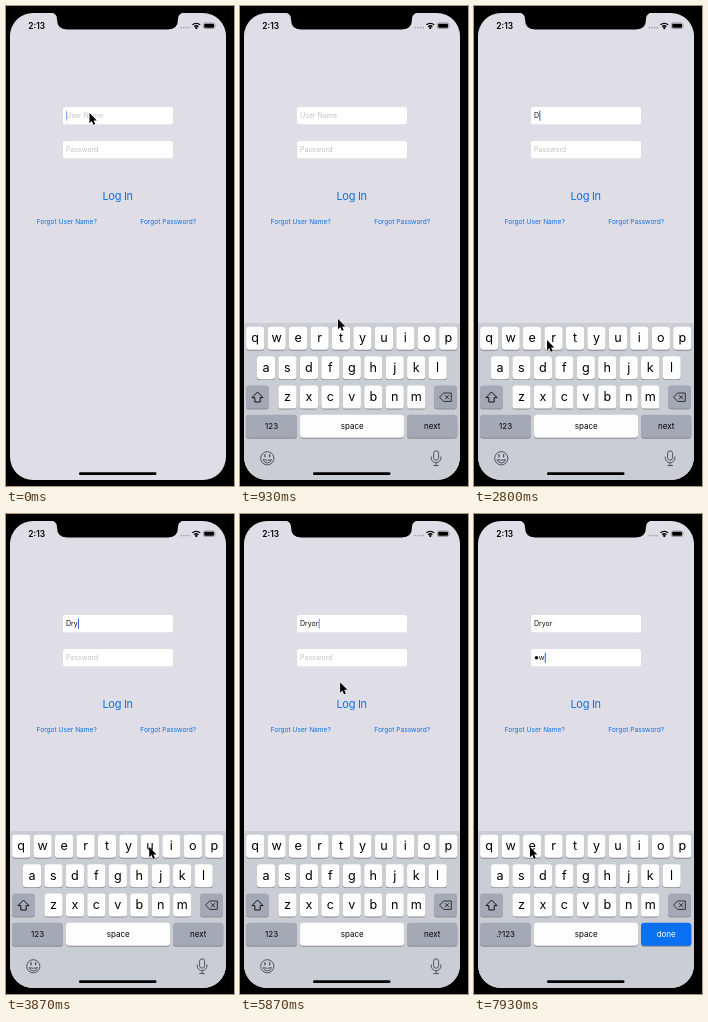
An HTML page that plays this animation: 228x480 px, repeating every 8000 ms.

```html
<!DOCTYPE html>
<html lang="en">
<head>
<meta charset="utf-8">
<title>Login screen</title>
<style>
html, body { margin: 0; width: 100%; height: 100%; overflow: hidden; background: #000; }
svg { display: block; width: 100%; height: 100%; font-family: Inter, Roboto, sans-serif; }
text { white-space: pre; }
.mid { text-anchor: middle; }
.hint { font-size: 7px; fill: #c3c3c7; }
.typed { font-size: 7px; fill: #111; }
.link { font-size: 6.6px; fill: #0b70e6; }
.key { font-size: 12.6px; }
.label { font-size: 8px; }
</style>
</head>
<body>
<svg id="stage" viewBox="0 0 228 480">
  <defs>
    <clipPath id="screen"><rect x="4" y="7" width="216" height="467" rx="23"/></clipPath>
    <filter id="soft" x="-30%" y="-30%" width="160%" height="160%">
      <feDropShadow dx="0" dy=".6" stdDeviation="1.3" flood-color="#444" flood-opacity=".45"/>
    </filter>
  </defs>
  <rect width="228" height="480"/>
  <g clip-path="url(#screen)">
    <rect x="4" y="7" width="216" height="467" fill="#dfdee6"/>
    <rect x="57" y="101" width="110" height="17.3" rx="2.6" fill="#fff"/>
    <rect x="57" y="135" width="110" height="17.3" rx="2.6" fill="#fff"/>
    <text id="userHint" class="hint" x="60" y="112.4">User Name</text>
    <text id="passHint" class="hint" x="60" y="146.3">Password</text>
    <text id="user" class="typed" x="60" y="112.4"></text>
    <circle id="dot" cx="62.5" cy="143.8" r="1.8" fill="#111"/>
    <text id="pass" class="typed" y="146.3"></text>
    <rect id="caret" width="1.1" height="10" fill="#3e6be0"/>
    <text class="mid" x="111.6" y="194" font-size="11" letter-spacing="-.3" fill="#0b70e6">Log In</text>
    <text class="link mid" x="60.7" y="218.3">Forgot User Name?</text>
    <text class="link mid" x="162.2" y="218.3">Forgot Password?</text>
    <g id="board">
      <rect x="4" y="317" width="216" height="160" fill="#cbcdd5"/>
      <g id="keys"></g>
      <g id="extras" fill="none" stroke="#4f5259" stroke-width="1">
        <circle cx="27.3" cy="452.3" r="6.6"/>
        <path d="M23.2 453.6Q27.3 455 31.4 453.6Q30.6 457 27.3 457T23.2 453.6Z"/>
        <path d="M25 448.8v2M29.6 448.8v2" stroke-width="1.4" stroke-linecap="round"/>
        <rect x="193.6" y="444.8" width="5" height="9.4" rx="2.5"/>
        <path d="M191.3 450.5v1.4a4.8 4.8 0 0 0 9.6 0v-1.4M196.1 456.8v2.8M193.3 459.6h5.6"/>
      </g>
      <g id="popup">
        <path id="bubble" fill="#fdfdfe" filter="url(#soft)"/>
        <text id="bubbleText" class="mid" y="309.5" font-size="19"></text>
      </g>
    </g>
    <rect x="73" y="466.3" width="77.5" height="2.8" rx="1.4"/>
  </g>
  <path d="M44 6.5Q51 7 51 13Q51 23.4 61 23.4H162Q172 23.4 172 13Q172 7 179 6.5Z"/>
  <text x="22.3" y="22.8" font-size="8.4" font-weight="600">2:13</text>
  <g fill="#a2a2a9" id="signal"></g>
  <g fill="none" stroke="#000" stroke-width="1.3">
    <path d="M186.4 18.9a5.6 5.6 0 0 1 7.8 0M188.2 20.8a3 3 0 0 1 4.2 0"/>
    <circle cx="190.3" cy="22" r=".5"/>
  </g>
  <rect x="197.4" y="16.9" width="11.4" height="5.6" rx="1.6" fill="none" stroke="#77777d" stroke-width=".6"/>
  <rect x="198.2" y="17.7" width="9.8" height="4" rx=".9"/>
  <path d="M209.6 18.6q1.1 1.1 0 2.2z" fill="#77777d"/>
  <path id="mouse" d="M0 0V10.2L2.3 8.1L3.9 11.8L5.7 11L4.1 7.4H7.3Z" stroke="#fff" stroke-width=".7" stroke-opacity=".85" paint-order="stroke"/>
</svg>
<script>
const LOOP = 8000, SHIFT_ON = 1500, FOCUS_PASS = 6290, POP = 140, PITCH = 21.45;
const $ = id => document.getElementById(id);
const clamp = (v, lo = 0, hi = 1) => Math.min(hi, Math.max(lo, v));
const GREY = '#a5a9b5', WHITE = '#fdfdfe', BLUE = '#0a70f2';

const userKeys = [[2400, 'D'], [2960, 'r'], [3520, 'y'], [4440, 'o'], [4920, 'r']];
const passKeys = [[7240, 'q'], [7600, 'w']];
const presses = [...userKeys, ...passKeys];

// Pointer stops: time, x, y
const stops = [
  [560, 83.5, 107], [930, 98, 313], [1400, 15, 388], [1750, 15, 388],
  [2300, 67, 358], [2600, 67, 358], [2800, 73, 334], [2920, 77, 333],
  [3230, 77, 333], [3480, 120, 333], [3640, 120, 333], [3930, 146, 333],
  [4200, 146, 333], [4400, 184, 333], [4580, 184, 333], [4880, 75, 333],
  [5270, 75, 333], [6050, 104, 143], [6340, 104, 143], [6700, 20, 310],
  [7050, 20, 310], [7200, 13, 333], [7430, 13, 333], [7560, 35, 333],
  [7700, 35, 333], [7930, 56, 333]
];

function add(parent, tag, attrs, text) {
  const el = document.createElementNS('http://www.w3.org/2000/svg', tag);
  for (const k in attrs) el.setAttribute(k, attrs[k]);
  if (text) el.textContent = text;
  parent.append(el);
  return el;
}

function addKey(x, y, w, fill) {
  const box = { x, width: w, height: 23, rx: 3.2 };
  add($('keys'), 'rect', { ...box, y: y + .9, fill: '#898b91' });
  return add($('keys'), 'rect', { ...box, y, fill });
}

const addLabel = (x, text) => add($('keys'), 'text', { x, y: 422.6, class: 'label mid' }, text);

const keys = {};
[['qwertyuiop', 15.2, 320.8], ['asdfghjkl', 26, 350.2], ['zxcvbnm', 47.5, 379.6]].forEach(([row, x0, y]) => {
  [...row].forEach((ch, i) => {
    const x = x0 + i * PITCH;
    addKey(x - 9.1, y, 18.2, WHITE);
    keys[ch] = { x, y, text: add($('keys'), 'text', { x, y: y + 15.6, class: 'key mid' }, ch) };
  });
});

const shiftKey = addKey(6, 379.6, 23, GREY);
const shiftIcon = add($('keys'), 'path', {
  d: 'M17.5 386L23 391.6H20.2V396H14.8V391.6H12Z',
  stroke: '#111', 'stroke-width': 1, 'stroke-linejoin': 'round'
});
addKey(194, 379.6, 23, GREY);
add($('keys'), 'path', {
  d: 'M203.6 387H211.3V395.4H203.6L199.6 391.2ZM205 389.2L209 393.2M209 389.2L205 393.2',
  fill: 'none', stroke: '#222', 'stroke-width': .9, 'stroke-linejoin': 'round'
});
addKey(6, 408.8, 51, GREY);
addKey(60, 408.8, 104, WHITE);
const returnKey = addKey(167, 408.8, 50.3, GREY);
const modeLabel = addLabel(31.6, '123');
addLabel(112.2, 'space');
const returnLabel = addLabel(192.2, 'next');

for (let i = 0; i < 4; i++) add($('signal'), 'circle', { cx: 175.2 + i * 2.7, cy: 21.6, r: .85 });

function pointerAt(t) {
  const i = stops.findIndex(s => s[0] > t);
  if (i === 0) return stops[0].slice(1);
  if (i < 0) return stops.at(-1).slice(1);
  const [t0, x0, y0] = stops[i - 1], [t1, x1, y1] = stops[i];
  const p = (t - t0) / (t1 - t0), e = p * p * (3 - 2 * p);
  return [x0 + (x1 - x0) * e, y0 + (y1 - y0) * e];
}

// Balloon that grows out of a pressed key
function bubblePath({ x, y }) {
  const l = Math.max(5, x - 15.6), r = x + 15.6, kl = x - 9.1, kr = x + 9.1;
  const top = y - 32, waist = y - 6, neck = y + 5, end = y + 23;
  return `M${l + 5} ${top}H${r - 5}Q${r} ${top} ${r} ${top + 5}V${waist}` +
    `C${r} ${waist + 6} ${kr} ${neck - 6} ${kr} ${neck}V${end - 3}Q${kr} ${end} ${kr - 3} ${end}` +
    `H${kl + 3}Q${kl} ${end} ${kl} ${end - 3}V${neck}` +
    `C${kl} ${neck - 6} ${l} ${waist + 6} ${l} ${waist}V${top + 5}Q${l} ${top} ${l + 5} ${top}Z`;
}

const typedBy = (list, t) => list.filter(k => k[0] <= t).map(k => k[1]).join('');
const show = (el, on) => el.setAttribute('visibility', on ? 'visible' : 'hidden');

function drawFields(t, inPass) {
  const name = typedBy(userKeys, t), secret = typedBy(passKeys, t), masked = secret.length > 1;
  $('user').textContent = name;
  $('pass').textContent = secret.slice(-1);
  $('pass').setAttribute('x', masked ? 64.8 : 60);
  show($('dot'), masked);
  show($('userHint'), !name);
  show($('passHint'), !secret);

  const field = inPass ? $('pass') : $('user'), value = inPass ? secret : name;
  const width = value ? field.getComputedTextLength() : 0;
  $('caret').setAttribute('x', (inPass && masked ? 64.8 : 60) + width + (value ? .2 : 0));
  $('caret').setAttribute('y', inPass ? 138.7 : 104.7);
  const edits = [60, ...presses.map(k => k[0]), FOCUS_PASS].filter(e => e <= t);
  const start = edits.length ? Math.max(...edits) - 60 : 0;
  $('caret').setAttribute('opacity', clamp(.5 + 3 * Math.sin((t - start) / 500 * Math.PI)));
  return secret;
}

function drawBoard(t, inPass, secret) {
  const left = 1 - clamp((t - 200) / 550);
  $('board').setAttribute('transform', `translate(0 ${158 * left ** 3})`);

  const upper = t >= SHIFT_ON && t < userKeys[0][0] + POP;
  for (const ch in keys) keys[ch].text.textContent = upper ? ch.toUpperCase() : ch;
  shiftKey.setAttribute('fill', upper ? WHITE : GREY);
  shiftIcon.setAttribute('fill', upper ? '#111' : 'none');

  show($('extras'), !inPass);
  modeLabel.textContent = inPass ? '.?123' : '123';
  returnLabel.textContent = inPass ? 'done' : 'next';
  returnLabel.setAttribute('fill', secret ? '#fff' : inPass ? '#777a83' : '#000');
  returnKey.setAttribute('fill', secret ? BLUE : GREY);

  const press = presses.find(k => t >= k[0] && t < k[0] + POP);
  $('popup').setAttribute('display', press ? 'inline' : 'none');
  if (press) {
    const key = keys[press[1].toLowerCase()];
    $('bubble').setAttribute('d', bubblePath(key));
    $('bubbleText').textContent = press[1];
    $('bubbleText').setAttribute('x', Math.max(key.x, 18));
    $('bubbleText').setAttribute('y', key.y - 11.2);
  }
}

function draw(t) {
  const inPass = t >= FOCUS_PASS;
  drawBoard(t, inPass, drawFields(t, inPass));
  $('mouse').setAttribute('transform', `translate(${pointerAt(t)})`);
}

const begin = performance.now();
function tick() {
  draw((performance.now() - begin) % LOOP);
  requestAnimationFrame(tick);
}
tick();
</script>
</body>
</html>
```
